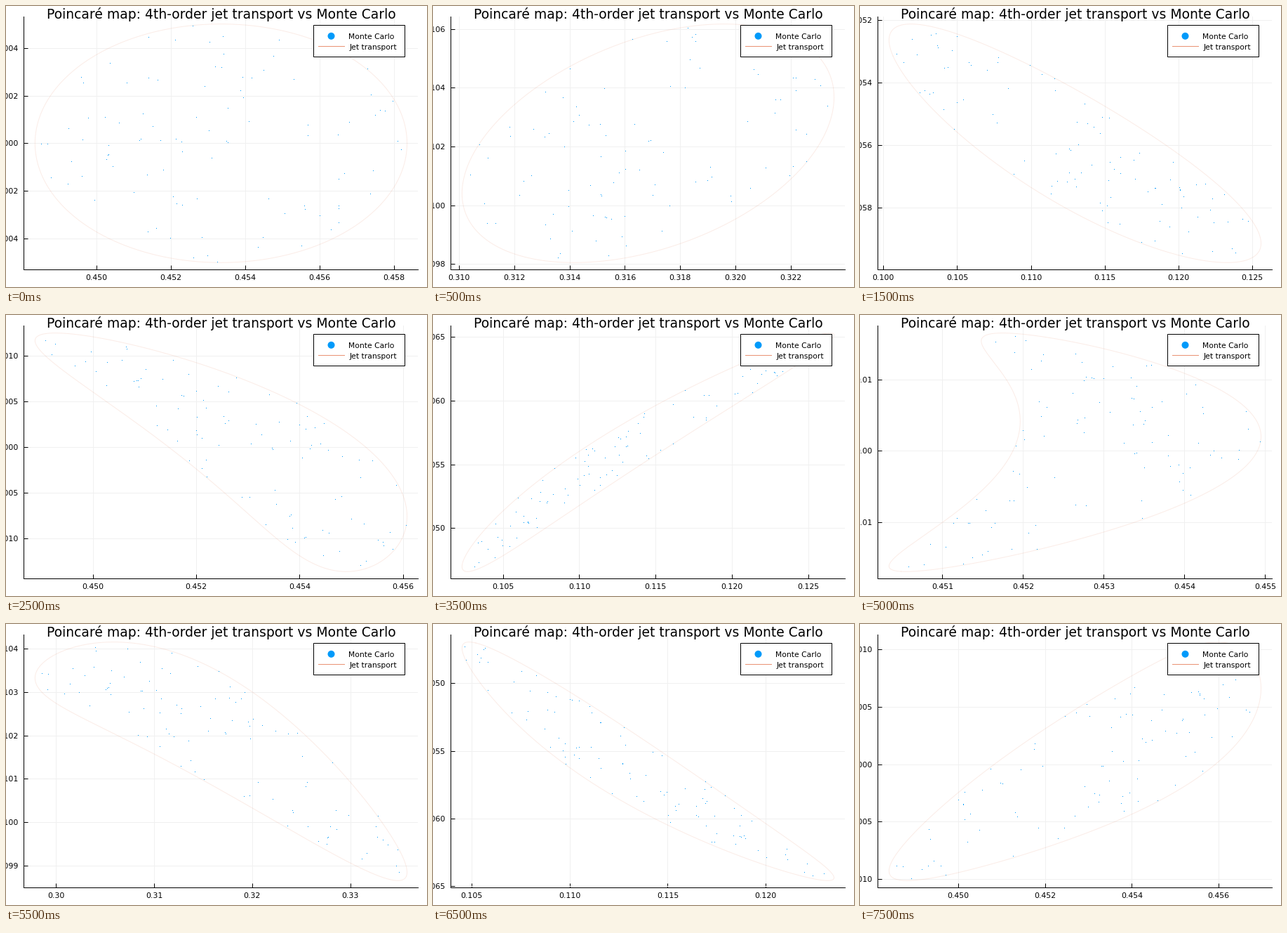
Animation of 600x400 px, one loop 8 s. Source, as a matplotlib script:

```python
import numpy as np
import matplotlib.pyplot as plt
from matplotlib.animation import FuncAnimation
from matplotlib.patches import Circle, Rectangle
from matplotlib.transforms import Affine2D

W, H, DPI = 600, 400, 100
PT = 72 / DPI                 # points per pixel
FRAMES, INTERVAL, SAMPLES = 16, 500, 98
BLUE, RED = "#009afa", "#e26f46"

# Henon-Heiles system on the section x = 0, px > 0
ENERGY, Y0, RADIUS, DT = 0.1025, 0.45335, 0.005, 0.02


def flow(s):
    x, y, px, py = s
    return np.array([px, py, -x - 2 * x * y, -y - x * x + y * y])


def flow_by_x(s):
    return flow(s) / s[2]


def rk4(f, s, h):
    a = f(s)
    b = f(s + h / 2 * a)
    c = f(s + h / 2 * b)
    d = f(s + h * c)
    return s + h / 6 * (a + 2 * b + 2 * c + d)


def poincare(r, angle, n):
    """Successive (y, py) on the section for starts in polar form."""
    y = Y0 + RADIUS * r * np.cos(angle)
    py = RADIUS * r * np.sin(angle)
    px = np.sqrt(2 * ENERGY - py**2 - y**2 + 2 * y**3 / 3)
    s = np.array([0 * y, y, px, py])
    out = np.empty((n, 2, y.size))
    out[0] = y, py
    hits = np.ones(y.size, int)
    while hits.min() < n:
        new = rk4(flow, s, DT)
        i = np.flatnonzero((s[0] < 0) & (new[0] >= 0) & (hits < n))
        if i.size:
            p = s[:, i]
            z = rk4(flow_by_x, p, -p[0])   # land exactly on x = 0
            out[hits[i], :, i] = z[[1, 3]].T
            hits[i] += 1
        s = new
    return out


def limits(v):
    pad = 0.03 * np.ptp(v)
    return v.min() - pad, v.max() + pad


def ticks(lo, hi):
    """Largest 1-2-5 step that fits at least about 3.4 times."""
    goal = (hi - lo) / 3.4
    k = int(np.floor(np.log10(goal)))
    step = max(m for m in (1, 2, 5) if m * 10.0**k <= goal) * 10.0**k
    vals = np.arange(np.ceil(lo / step), np.floor(hi / step) + 1) * step
    return vals, [f"{v:.{max(-k, 0)}f}" for v in vals]


rng = np.random.default_rng(5)
curves = poincare(1, np.linspace(0, 2 * np.pi, 401), FRAMES)
clouds = poincare(np.sqrt(rng.random(SAMPLES)),
                  2 * np.pi * rng.random(SAMPLES), FRAMES)

plt.rcParams["font.family"] = "DejaVu Sans"
fig = plt.figure(figsize=(W / DPI, H / DPI), dpi=DPI, facecolor="white")
ax = fig.add_axes([25.45 / W, 1 - 375.45 / H, 562 / W, 360 / H])
ax.spines[["top", "right"]].set_visible(False)
ax.spines[["left", "bottom"]].set_linewidth(PT)
ax.set_axisbelow(True)
ax.grid(color="#f0f0f0", lw=PT)
ax.tick_params(direction="in", length=6 * PT, width=PT, labelsize=11 * PT)
ax.tick_params(axis="x", pad=7 * PT)
ax.tick_params(axis="y", pad=8 * PT)

ring, = ax.plot([], [], color=RED, alpha=0.13, lw=PT)
dots, = ax.plot([], [], ",", color=BLUE)

# Title and legend in stage pixels, y down
stage = Affine2D().scale(1 / W, -1 / H).translate(0, 1) + fig.transFigure


def label(x, y, text, size, ha="left"):
    fig.text(x, y, text, transform=stage, fontsize=size * PT,
             ha=ha, va="baseline")


label(306.5, 18, "Poincaré map: 4th-order jet transport vs Monte Carlo",
      18.8, "center")
fig.add_artist(Rectangle((438.4, 27.4), 130, 45, transform=stage,
                         fc="white", ec="black", lw=PT))
fig.add_artist(Circle((463.5, 42.8), 5, transform=stage, fc=BLUE, lw=0,
                      zorder=2))
fig.add_artist(plt.Line2D([445, 482], [57.4, 57.4], transform=stage,
                          color=RED, alpha=0.75, lw=PT))
label(487.5, 47, "Monte Carlo", 10.7)
label(489.5, 62, "Jet transport", 10.7)


def draw(i):
    x, y = curves[i]
    ring.set_data(x, y)
    dots.set_data(*clouds[i])
    ax.set_xlim(limits(x))
    ax.set_ylim(limits(y))
    ax.set_xticks(*ticks(*ax.get_xlim()))
    ax.set_yticks(*ticks(*ax.get_ylim()))
    return [ring, dots]


anim = FuncAnimation(fig, draw, frames=FRAMES, interval=INTERVAL,
                     init_func=lambda: draw(0), repeat=True, blit=False)
plt.show()
```
